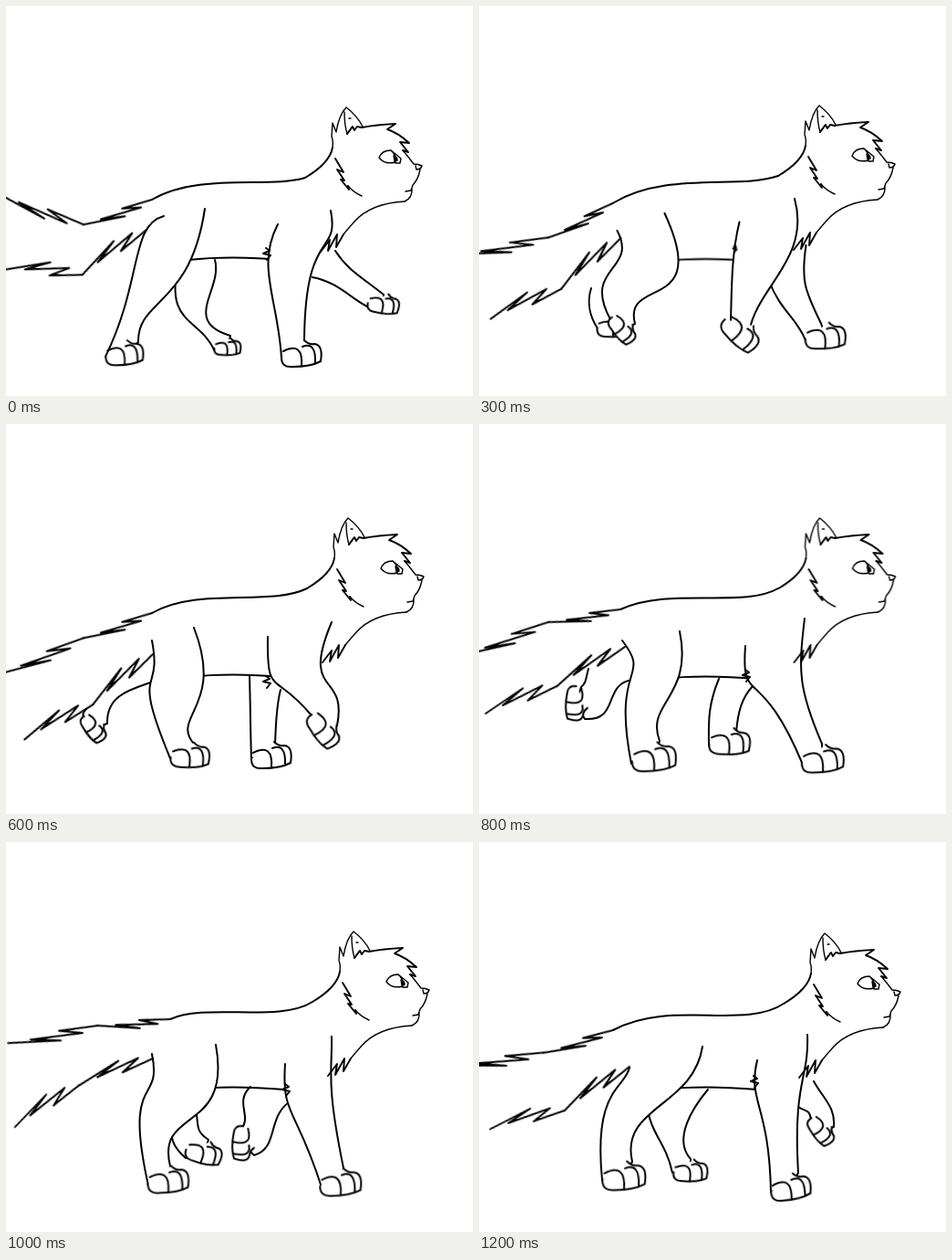
These frames come from a looping animation (512 px wide and 427 px high, 1.3 s). An HTML page without scripts:

```html
<!DOCTYPE html>
<html lang="en">
<head>
<meta charset="utf-8">
<title>Walking cat</title>
<style>
html, body { margin: 0; width: 100%; height: 100%; overflow: hidden; background: #fff; }
svg { display: block; width: 100%; height: 100%; }
path { fill: none; stroke: #000; stroke-width: 2; stroke-linecap: round; stroke-linejoin: round; vector-effect: non-scaling-stroke; }
.near, .pad { fill: #fff; }
.thin path { stroke-width: 1.4; }
.thin .bold { stroke-width: 1.9; }
.thin .ink { fill: #000; }

/* two steps per key pose: the pose itself, then the halfway drawing */
.move { animation: 1.3s steps(2) infinite; }
#head { animation-name: head; }
#back { animation-name: back; }
#belly { animation-name: belly; }
#elbow { animation-name: elbow; }
#tailTop { animation-name: tailTop; }
#tipTop { animation-name: tipTop; }
#tailLow { animation-name: tailLow; }
#tipLow { animation-name: tipLow; }
#hindFar { animation-name: hindFar; }
#hindFarPaw { animation-name: hindFarPaw; }
#hindNear { animation-name: hindNear; }
#hindNearPaw { animation-name: hindNearPaw; }
#foreFar { animation-name: foreFar; }
#foreFarPaw { animation-name: foreFarPaw; }
#foreNear { animation-name: foreNear; }
#foreNearPaw { animation-name: foreNearPaw; }

/* body */
@keyframes head {
  0%, 15.38% { transform: translate(0, 0); }
  30.76% { transform: translate(0, -4px); }
  46.15% { transform: translate(2px, -8px); }
  61.53% { transform: translate(.5px, -8px); }
  76.92% { transform: translate(8px, -13px); }
  92.3%, 100% { transform: translate(6px, -11px); }
}
@keyframes back {
  0% { d: path("M328 188C290 200 210 182 160 212"); }
  15.38% { d: path("M328 188C290 202 220 186 141 213"); }
  30.76% { d: path("M328 184C280 200 190 175 152 219"); }
  46.15% { d: path("M330 180C290 200 210 178 160 207"); }
  61.53% { d: path("M328 180C290 202 210 178 155 203"); }
  76.92% { d: path("M336 175C300 198 220 176 180 194"); }
  92.3%, 100% { d: path("M334 177C290 206 210 172 147 206"); }
}
@keyframes belly {
  0%, 15.38% { transform: translateY(0); }
  30.76% { transform: translateY(3px); }
  46.15% { transform: translateY(-1px); }
  61.53% { transform: translateY(1px); }
  76.92%, 92.3%, 100% { transform: translateY(-7px); }
}
@keyframes elbow {
  0% { transform: translate(285px, 265px) scale(1); }
  15.38% { transform: translate(283px, 260px) scale(1); }
  30.76% { transform: translate(277px, 265px) scale(0); }
  46.15% { transform: translate(285px, 276px) scale(1); }
  61.53% { transform: translate(292px, 269px) scale(1); }
  76.92% { transform: translate(306px, 265px) scale(1); }
  92.3%, 100% { transform: translate(301px, 256px) scale(1); }
}

/* tail: each strand swings at the root and bends halfway */
@keyframes tailTop {
  0% { transform: translate(160px, 212px) rotate(-20deg); }
  15.38% { transform: translate(141px, 213px) rotate(-23deg); }
  30.76% { transform: translate(152px, 219px) rotate(-33deg); }
  46.15% { transform: translate(160px, 207px) rotate(-20deg); }
  61.53% { transform: translate(155px, 203px) rotate(-10deg); }
  76.92% { transform: translate(180px, 194px) rotate(-5deg); }
  92.3%, 100% { transform: translate(147px, 206px) rotate(-18deg); }
}
@keyframes tipTop {
  0% { transform: translate(-80px, 0) rotate(40deg); }
  15.38% { transform: translate(-80px, 0) rotate(14deg); }
  30.76% { transform: translate(-80px, 0) rotate(21deg); }
  46.15% { transform: translate(-80px, 0) rotate(-3deg); }
  61.53% { transform: translate(-80px, 0) rotate(-11deg); }
  76.92% { transform: translate(-80px, 0) rotate(-6deg); }
  92.3%, 100% { transform: translate(-80px, 0) rotate(10deg); }
}
@keyframes tailLow {
  0% { transform: translate(154px, 245px) rotate(-35deg); }
  15.38% { transform: translate(153px, 250px) rotate(-38deg); }
  30.76% { transform: translate(158px, 258px) rotate(-43deg); }
  46.15% { transform: translate(161px, 252px) rotate(-40deg); }
  61.53% { transform: translate(160px, 244px) rotate(-30deg); }
  76.92% { transform: translate(161px, 237px) rotate(-20deg); }
  92.3%, 100% { transform: translate(165px, 246px) rotate(-34deg); }
}
@keyframes tipLow {
  0% { transform: translate(-86px, 0) rotate(39deg); }
  15.38%, 92.3%, 100% { transform: translate(-86px, 0) rotate(20deg); }
  30.76% { transform: translate(-86px, 0) rotate(15deg); }
  46.15% { transform: translate(-86px, 0) rotate(13deg); }
  61.53% { transform: translate(-86px, 0) rotate(9deg); }
  76.92% { transform: translate(-86px, 0) rotate(-13deg); }
}

/* limbs: rear edge down to the heel, through the paw, front edge up */
@keyframes hindFar {
  0% { d: path("M190 278C172 350 212 340 229 378L243 374 246 361C192 345 238 310 229 278"); }
  15.38% { d: path("M140 310C140 330 146 350 157 360L170 359 170 348C170 335 170 325 172 312"); }
  30.76% { d: path("M106 308C96 318 97 330 103 346L124 345 128 331C126 305 142 300 156 288"); }
  46.15% { d: path("M88 312C84 316 84 318 85 322L96 333 111 328C110 295 140 290 164 281"); }
  61.53% { d: path("M120 268C117 278 118 283 112 288L106 306 116 323C155 325 135 285 168 280"); }
  76.92% { d: path("M186 308C176 320 184 335 197 346L217 341 222 326C206 316 212 308 208 294"); }
  92.3%, 100% { d: path("M186 298C190 320 205 330 212 362L232 361 232 347C212 325 235 290 251 271"); }
}
@keyframes hindNear {
  0% { d: path("M173 230C136 240 150 300 109 384L130 381 145 368C144 320 202 330 218 222"); }
  15.38% { d: path("M153 245C165 305 95 300 122 362L136 372 150 366C150 300 250 350 204 227"); }
  30.76% { d: path("M150 247C185 275 130 270 166 324L178 336 192 330C165 290 260 325 203 227"); }
  46.15% { d: path("M160 237C172 300 136 260 180 366L203 364 206 350C180 320 240 310 206 223"); }
  61.53% { d: path("M157 237C190 280 145 260 167 372L192 366 198 347C182 305 235 300 220 227"); }
  76.92% { d: path("M160 232C172 290 128 250 156 376L178 371 180 355C164 290 248 320 230 222"); }
  92.3%, 100% { d: path("M165 247C160 270 125 270 135 370L159 367 168 350C154 290 235 290 245 224"); }
}
@keyframes foreFar {
  0% { d: path("M336 297C364 302 380 322 398 330L414 327 414 316C392 298 375 290 361 268"); }
  15.38% { d: path("M319 302C345 330 365 345 375 370L396 367 392 353C365 300 356 300 365 260"); }
  30.76% { d: path("M316 298C317 340 330 335 341 362L364 358 358 342C348 320 350 300 352 264"); }
  46.15% { d: path("M267 276C268 310 268 340 269 366L291 364 295 350C296 330 296 310 301 291"); }
  61.53% { d: path("M263 279C250 310 252 330 252 352L275 350 282 337C284 315 288 300 300 287"); }
  76.92% { d: path("M268 268C250 285 270 300 258 314L259 330 272 343C300 335 285 300 313 283"); }
  92.3%, 100% { d: path("M350 290C357 295 362 292 364 303L375 316 389 312C391 290 378 282 367 262"); }
}
@keyframes foreNear {
  0% { d: path("M298 239C274 285 298 320 302 385L324 382 327 366C328 240 366 275 356 224"); }
  15.38% { d: path("M287 235C282 280 274 320 283 384L305 381 312 365C306 270 370 290 349 210"); }
  30.76% { d: path("M284 238C272 262 280 290 269 312L268 334 281 346C304 345 358 262 343 212"); }
  46.15% { d: path("M287 233C286 300 294 270 334 318L348 335 363 330C375 270 322 300 357 217"); }
  61.53% { d: path("M292 243C287 310 308 260 355 373L377 367 376 350C350 290 350 270 357 213"); }
  76.92% { d: path("M306 243C302 300 318 290 346 378L367 373 370 357C350 260 358 250 357 213"); }
  92.3%, 100% { d: path("M305 239C294 285 318 285 320 383L342 379 350 362C344 260 362 260 360 211"); }
}

/* paws: place, tilt and size */
@keyframes hindFarPaw {
  0% { transform: translate(243px, 374px) rotate(5deg) scale(.66); }
  15.38% { transform: translate(170px, 359px) rotate(0deg) scale(.62); }
  30.76% { transform: translate(125px, 345px) rotate(8deg) scale(1); }
  46.15% { transform: translate(96px, 333px) rotate(60deg) scale(.75); }
  61.53% { transform: translate(106px, 306px) rotate(100deg) scale(.85); }
  76.92% { transform: translate(217px, 341px) rotate(20deg) scale(.9); }
  92.3%, 100% { transform: translate(232px, 361px) rotate(5deg) scale(.85); }
}
@keyframes hindNearPaw {
  0% { transform: translate(130px, 381px) rotate(0deg) scale(.94); }
  15.38% { transform: translate(136px, 372px) rotate(55deg) scale(.78); }
  30.76% { transform: translate(178px, 336px) rotate(60deg) scale(.78); }
  46.15% { transform: translate(202px, 364px) rotate(5deg) scale(.97); }
  61.53% { transform: translate(192px, 366px) rotate(0deg) scale(1.1); }
  76.92% { transform: translate(178px, 371px) rotate(0deg) scale(1.02); }
  92.3%, 100% { transform: translate(159px, 367px) rotate(0deg) scale(1.08); }
}
@keyframes foreFarPaw {
  0% { transform: translate(414px, 327px) rotate(14deg) scale(.78); }
  15.38% { transform: translate(396px, 367px) rotate(5deg) scale(.95); }
  30.76% { transform: translate(364px, 358px) rotate(0deg) scale(1.06); }
  46.15% { transform: translate(291px, 364px) rotate(0deg) scale(1); }
  61.53% { transform: translate(275px, 349px) rotate(5deg) scale(1.02); }
  76.92% { transform: translate(259px, 330px) rotate(100deg) scale(.85); }
  92.3%, 100% { transform: translate(375px, 316px) rotate(60deg) scale(.78); }
}
@keyframes foreNearPaw {
  0% { transform: translate(324px, 382px) rotate(0deg) scale(1); }
  15.38% { transform: translate(305px, 383px) rotate(0deg) scale(1.05); }
  30.76% { transform: translate(268px, 334px) rotate(100deg) scale(1); }
  46.15% { transform: translate(348px, 335px) rotate(60deg) scale(.95); }
  61.53% { transform: translate(377px, 368px) rotate(0deg) scale(1.05); }
  76.92% { transform: translate(367px, 374px) rotate(0deg) scale(1.03); }
  92.3%, 100% { transform: translate(342px, 379px) rotate(-4deg) scale(1); }
}
</style>
</head>
<body>
<svg viewBox="0 0 512 427">
  <defs>
    <g id="paw">
      <path class="pad" d="M-22 3Q-22 14 -10 13Q10 13 21 7Q24 -11 14 -12Q8 -11 3 -16"/>
      <path d="M-20 -4Q2 -15 0 12M1 -9Q16 -15 15 9"/>
    </g>
    <path id="fur" d="M0 0l-34-2 20 6-46-3 26 6-46-7"/>
  </defs>

  <path id="hindFar" class="move"/>
  <g id="hindFarPaw" class="move"><use href="#paw"/></g>
  <path id="foreFar" class="move"/>
  <g id="foreFarPaw" class="move"><use href="#paw"/></g>
  <path id="belly" class="move" d="M200 278Q245 273 305 278"/>
  <path id="hindNear" class="move near"/>
  <g id="hindNearPaw" class="move"><use href="#paw"/></g>
  <path id="foreNear" class="move near"/>
  <g id="foreNearPaw" class="move"><use href="#paw"/></g>
  <path id="elbow" class="move" d="M0 0l4 3-7 3 8 2-4 5"/>
  <path id="back" class="move"/>

  <g id="tailTop" class="move">
    <use href="#fur"/>
    <g id="tipTop" class="move"><use href="#fur" transform="scale(1.25 1.2)"/></g>
  </g>
  <g id="tailLow" class="move">
    <use href="#fur" transform="scale(1.07 -1.5)"/>
    <g id="tipLow" class="move"><use href="#fur" transform="scale(1.05 -1.6)"/></g>
  </g>

  <g id="head" class="move thin">
    <path class="bold" d="M358 155Q355 172 328 188"/>
    <path d="M437 214Q400 216 382 236Q374 245 370 250"/>
    <path class="bold" d="M370 250l-8 14 1-14-10 18 2-12-10 13"/>
    <path d="M358 155Q359 147 357 143L358 128L362 138Q365 119 373 111Q385 120 391 132M371 116Q371 130 374 140L379 133M376 123h2"/>
    <path class="bold" d="M374 140L380 132L382 136L385 132L390 133Q406 130 427 129L418 135Q430 139 442 150L432 149L441 160L435 158"/>
    <path d="M435 158Q441 165 447 173Q452 173 456 175Q455 179 450 179L449 175M454 179Q452 190 446 196L444 202L438 203M445 199Q446 210 437 214"/>
    <path d="M409 166Q412 158 422 158Q428 163 427 171Q415 174 409 166M422 158L433 167L432 172L427 172"/>
    <path class="ink" d="M425 164q4 1 4 5l-3 1z"/>
    <path class="bold" d="M361 167L370 182L363 179L371 191L367 190L376 201L375 197"/>
    <path d="M375 197Q381 204 390 208"/>
  </g>
</svg>
</body>
</html>
```
